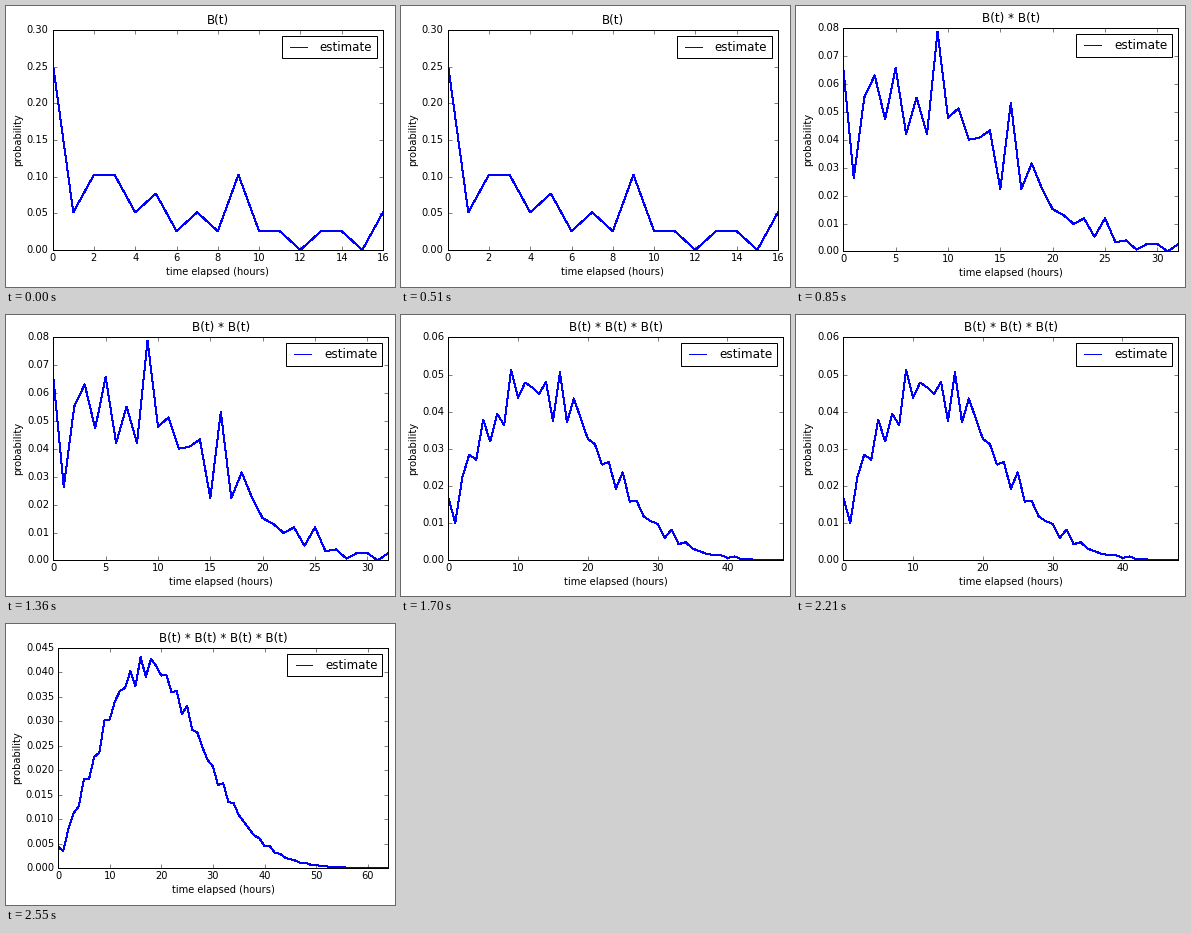
These frames come from a looping animation (389 px wide and 281 px high, 3.4 s). A matplotlib script:

```python
import numpy as np
import matplotlib.pyplot as plt
from matplotlib.animation import FuncAnimation

W, H, DPI = 389, 281, 72
EPS = 1e-3  # keeps the pixel size from rounding down
PANELS = 4
AX_LEFT, AX_TOP, AX_W, AX_H = 47.3, 22.4, 335, 223
OVERHANG = 5.5  # extra width that long tick labels need

plt.style.use("classic")
plt.rcParams.update({
    "font.family": "DejaVu Sans",
    "figure.dpi": DPI,
    "savefig.dpi": "figure",
    "figure.facecolor": "white",
    "lines.antialiased": False,
    "axes.titlepad": 6,
    "axes.labelpad": 4,
    "xtick.major.pad": 3,
})

counts = np.array([10, 2, 4, 4, 2, 3, 1, 2, 1, 4, 1, 1, 0, 1, 1, 0, 2])
B = counts / counts.sum()

fig = plt.figure(figsize=((W + EPS) / DPI, (H + EPS) / DPI), dpi=DPI)


def self_convolve(n):
    """Distribution of the sum of n independent draws from B."""
    out = B
    for _ in range(n - 1):
        out = np.convolve(out, B)
    return out


def layout(i):
    """Scale and axes rectangle; plots with overhanging labels shrink to fit."""
    extra_left = OVERHANG if i == PANELS - 1 else 0  # third decimal
    extra_right = OVERHANG if i == 0 else 0          # tick at the right end
    scale = W / (W + extra_left + extra_right)
    left = (AX_LEFT + extra_left) * scale
    bottom = H / 2 + (H / 2 - AX_TOP - AX_H) * scale
    return scale, [left / W, bottom / H, AX_W * scale / W, AX_H * scale / H]


def draw(i):
    p = self_convolve(i + 1)
    scale, rect = layout(i)

    plt.rcParams["font.size"] = 10 * scale
    fig.clear()
    ax = fig.add_axes(rect)
    ax.plot(p, color="#0000ff", lw=1, label="estimate")
    ax.set_xlim(0, len(p) - 1)

    ax.set_title(" * ".join(["B(t)"] * (i + 1)))
    ax.set_xlabel("time elapsed (hours)")
    ax.set_ylabel("probability")
    ax.legend(loc="upper right")
    return [ax]


anim = FuncAnimation(fig, draw, frames=PANELS, init_func=lambda: draw(0),
                     interval=850, repeat=True, repeat_delay=0, blit=False)
plt.show()
```
